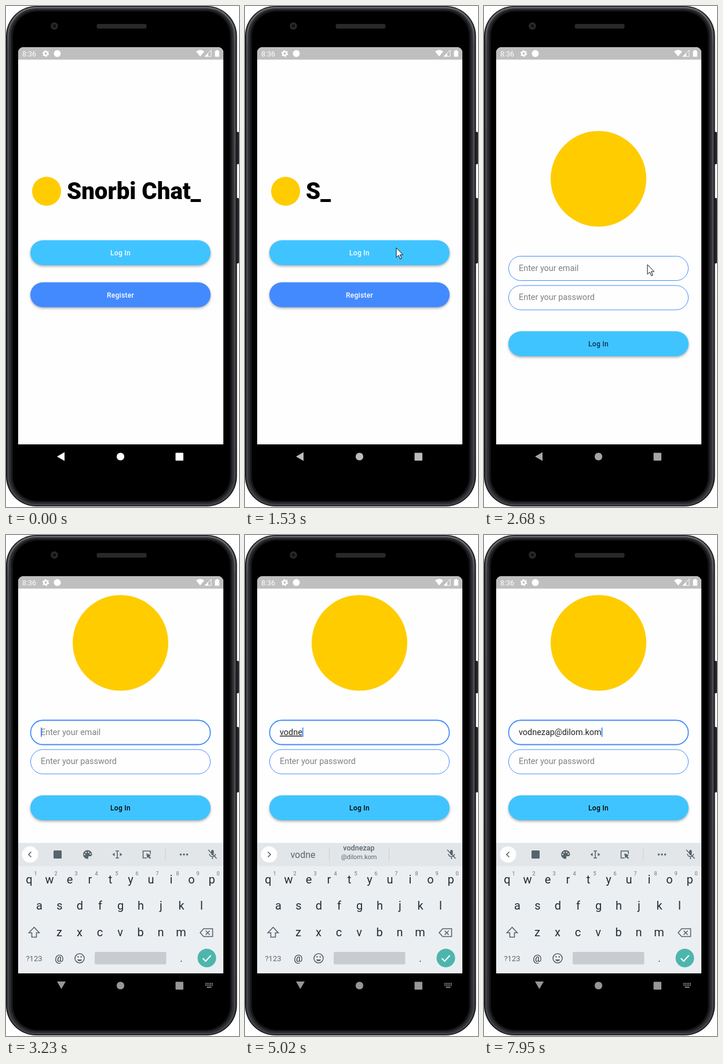
Animation of 402 by 864 pixels, one loop 8 s. Source, as an HTML page:

```html
<!DOCTYPE html>
<html lang="en">
<head>
<meta charset="utf-8">
<title>Login demo</title>
<style>
  html, body { margin: 0; width: 100%; height: 100%; overflow: hidden; background: #fff; }
  svg { display: block; width: 402px; height: 864px; font-family: Roboto, sans-serif; }
  .title { font-size: 40.2px; font-weight: 900; }
  .label { font-size: 12px; font-weight: 500; letter-spacing: .3px; text-anchor: middle; }
  .input { font-size: 14.4px; fill: #222; }
  .hint { font-size: 14.4px; fill: #808080; }
  .key { font-size: 20px; fill: #202c33; text-anchor: middle; }
  .sup { font-size: 9px; fill: #66727a; text-anchor: middle; }
  .mid { text-anchor: middle; fill: #5a666e; }
  .line { fill: none; stroke: #56636b; stroke-width: 1.6; }
  .shade { filter: drop-shadow(0 2.5px 2px rgba(0, 0, 0, .32)); }
</style>
</head>
<body>
<svg viewBox="0 0 402 864">
  <defs>
    <clipPath id="screen"><path d="M21 756V80a9 9 0 0 1 9-9H366a9 9 0 0 1 9 9V756z"/></clipPath>
    <linearGradient id="metal" x2="0" y2="1">
      <stop offset="0" stop-color="#6b6d71"/>
      <stop offset=".08" stop-color="#4a4c50"/>
      <stop offset="1" stop-color="#414347"/>
    </linearGradient>
  </defs>

  <g id="phone">
    <rect x="395" y="217" width="7" height="56" rx="2" fill="#242528"/>
    <rect x="395" y="331" width="7" height="113" rx="2" fill="#242528"/>
    <rect width="398.500" height="863" rx="52" fill="#161719"/>
    <rect x="2" y="1.500" width="394.500" height="860" rx="50" fill="url(#metal)"/>
    <rect x="5.500" y="4" width="387.500" height="855" rx="47" fill="#2c2d30"/>
    <rect x="9" y="7" width="380.500" height="849" rx="44" fill="#141517"/>
    <rect x="12" y="9.500" width="374.500" height="844" rx="42"/>
    <circle cx="83.500" cy="34.500" r="6.200" fill="#2a2a2c"/>
    <circle cx="83.500" cy="34.500" r="3" fill="#121214"/>
    <rect x="156.500" y="31" width="86" height="8" rx="3" fill="#29292a"/>
  </g>

  <g clip-path="url(#screen)">
    <rect x="21" y="71" width="354" height="685" fill="#fefefe"/>

    <g id="home">
      <text id="title" class="title" x="105" y="333"></text>
      <rect class="shade" x="42" y="404" width="311" height="43" rx="21.500" fill="#40c4ff"/>
      <circle id="ripple" cx="261" cy="426" fill="#fff"/>
      <text class="label" x="197.500" y="430" fill="#fff">Log In</text>
      <rect class="shade" x="42" y="476.500" width="311" height="43" rx="21.500" fill="#448aff"/>
      <text class="label" x="197.500" y="502.500" fill="#fff">Register</text>
    </g>

    <g id="login">
      <rect x="21" y="92" width="354" height="664" fill="#fefefe"/>
      <g id="form">
        <rect id="focus" x="42.500" y="431.500" width="310" height="42" rx="21" fill="none" stroke="#448aff"/>
        <rect x="42.500" y="482" width="310" height="42" rx="21" fill="none" stroke="#448aff"/>
        <text id="hint" class="hint" x="60" y="457">Enter your email</text>
        <text id="email" class="input" x="60" y="457"></text>
        <rect id="caret" y="444" width="1.800" height="16" fill="#448aff"/>
        <text class="hint" x="60" y="507">Enter your password</text>
        <rect class="shade" x="42" y="561" width="311" height="43" rx="21.500" fill="#40c4ff"/>
        <text id="submit" class="label" x="197.500" y="587">Log In</text>
      </g>
    </g>

    <circle id="logo" fill="#ffcc00"/>

    <g id="keyboard">
      <rect x="21" y="531" width="354" height="225" fill="#eceff2"/>
      <rect x="21" y="531" width="354" height="40" fill="#e2e6e9"/>
      <circle cx="41.500" cy="551" r="14" fill="#fff"/>
      <path id="chevron" class="line"/>
      <g class="line">
        <rect x="354" y="543" width="4.500" height="9" rx="2.200" fill="#56636b" stroke="none"/>
        <path d="M351 550a5.300 5.300 0 0 0 10.500 0M356.300 555.500V559M349 543l14.500 15"/>
      </g>
      <g id="tools">
        <rect x="82" y="544" width="14" height="14" rx="1.500" fill="#56636b"/>
        <path d="M140.500 543.500a7.500 7.500 0 0 0 0 15c2 0 2-1.300 1.400-2.300-.5-1.200.2-2.200 1.500-2.200h2c2 0 3-1.500 3-3.500 0-4-3.600-7-7.900-7z" fill="#56636b"/>
        <g fill="#e2e6e9"><circle cx="135.800" cy="551" r="1.200"/><circle cx="138" cy="547.500" r="1.200"/><circle cx="142.500" cy="547.300" r="1.200"/><circle cx="145.500" cy="550" r="1.200"/></g>
        <path class="line" d="M189 545h6M192 545v12M189 557h6"/>
        <path d="M183.500 551l4-3v6zM200.500 551l-4-3v6z" fill="#56636b"/>
        <path class="line" d="M249 550v-5h-12.500v12h6"/>
        <path d="M242 549l8 3-2.500 1.700 2.500 3.300-1.500 1.500-3-3-1.700 2z" fill="#56636b"/>
        <path d="M275 541v20" stroke="#c9ced2"/>
        <g fill="#56636b"><circle cx="301.500" cy="551" r="1.700"/><circle cx="307" cy="551" r="1.700"/><circle cx="312.500" cy="551" r="1.700"/></g>
      </g>
      <g id="suggest">
        <path d="M145.500 540v22M248.500 540v22" stroke="#c9ced2"/>
        <text id="word" class="mid" x="100" y="557" font-size="16"></text>
        <text id="name" class="mid" x="196.500" y="544" font-size="12.600" font-weight="500"></text>
        <text id="host" class="mid" x="196.500" y="559" font-size="11"></text>
      </g>
      <g id="keys"></g>
      <path class="line" d="M48.500 676.500l-9 9.500h5v7.500h8V686h5z"/>
      <path class="line" d="M341 679h15.500v13.500H341l-6-6.700zM344.500 682.500l7 7M351.500 682.500l-7 7"/>
      <text class="mid" x="48.500" y="734.500" font-size="13">?123</text>
      <text class="key" x="92" y="736" style="font-size:17px">@</text>
      <g class="line"><circle cx="127" cy="730" r="8"/><path d="M122.800 732a4.500 4.500 0 0 0 8.400 0z" fill="#56636b" stroke="none"/></g>
      <g fill="#56636b"><circle cx="124.300" cy="727.500" r="1.300"/><circle cx="129.700" cy="727.500" r="1.300"/></g>
      <rect x="153" y="719" width="123.500" height="21.500" rx="2.500" fill="#c8ccd0"/>
      <text class="key" x="302.500" y="736" style="font-size:17px">.</text>
      <circle cx="346.500" cy="729.500" r="16" fill="#4db6ac"/>
      <path d="M339.500 730l5 5 9-10" fill="none" stroke="#fff" stroke-width="2"/>
    </g>

    <rect x="21" y="71" width="354" height="21.500" fill="#bfbfbf"/>
    <g fill="#fff">
      <text x="28" y="86.500" font-size="12.500">8:36</text>
      <circle cx="68.500" cy="82" r="3.200" fill="none" stroke="#fff" stroke-width="2.600"/>
      <circle cx="68.500" cy="82" r="5" fill="none" stroke="#fff" stroke-width="1.700" stroke-dasharray="2.600 2.636"/>
      <circle cx="88.500" cy="82" r="6"/>
      <path d="M328 78.500a10 10 0 0 1 14 0L335 87z"/>
      <path d="M354 76v11h-11z" fill="none" stroke="#fff"/>
      <path d="M349 81.500V87h-6z"/>
      <path d="M360.500 77.500h2V76h3.500v1.500h2V87.500h-7.500z"/>
    </g>
  </g>

  <g id="nav">
    <path id="back"/>
    <circle cx="197.500" cy="777" r="6.600"/>
    <rect x="292.500" y="770.500" width="13.500" height="13.500" rx="1"/>
    <g id="imeKey">
      <path d="M344 773.500h13M344 776.500h13" fill="none" stroke="currentColor" stroke-width="1.800" stroke-dasharray="1.700 1.100"/>
      <rect x="346.500" y="779" width="8" height="1.700"/>
    </g>
  </g>

  <path id="mouse" d="M0 0V16.500L3.900 12.900 6.800 19.300 9.300 18.200 6.400 12H11.500z" fill="#fff" stroke="#111"/>
</svg>

<script>
const LOOP = 8000;
const APP = 'Snorbi Chat';
const USER = 'vodnezap', HOST = '@dilom.kom';
const KEY_TIMES = [4160, 4420, 4600, 4800, 4960, 5170, 5320, 5490, 5870,
                   6180, 6480, 6660, 6850, 7030, 7340, 7550, 7750, 7950];
const NAV = [[450, 255], [1450, 188], [1530, 188], [2140, 165], [2600, 165], [3380, 150]];
const MOUSE_X = [[650, 403], [1300, 261], [2450, 261], [2660, 282], [2900, 282], [3180, 404]];
const MOUSE_Y = [[650, 478], [1300, 417], [2450, 417], [2660, 446], [2900, 446], [3180, 780]];

const ui = {};
document.querySelectorAll('[id]').forEach(el => ui[el.id] = el);

const clamp = v => Math.min(1, Math.max(0, v));
const easeOut = p => 1 - (1 - p) ** 3;
const smooth = p => p * p * (3 - 2 * p);
const span = (t, a, b) => clamp((t - a) / (b - a));
const mix = (a, b, p) => a + (b - a) * p;
const show = (el, on) => el.style.display = on ? '' : 'none';

function set(el, attrs) {
  for (const k in attrs) el.setAttribute(k, attrs[k]);
}

function setText(el, s) {
  if (el.textContent !== s) el.textContent = s;
}

function track(t, stops) {
  const i = stops.findIndex(s => s[0] > t);
  if (i === 0) return stops[0][1];
  if (i < 0) return stops[stops.length - 1][1];
  const [a, b] = [stops[i - 1], stops[i]];
  return mix(a[1], b[1], smooth(span(t, a[0], b[0])));
}

function buildKeys() {
  const rows = [['qwertyuiop', 40, 600.5], ['asdfghjkl', 57.5, 645.5], ['zxcvbnm', 92, 691.5]];
  let out = '';
  rows.forEach(([letters, x0, y], row) => [...letters].forEach((c, i) => {
    const x = x0 + i * 35;
    out += `<text class="key" x="${x}" y="${y}">${c}</text>`;
    if (!row) out += `<text class="sup" x="${x + 11}" y="586.5">${(i + 1) % 10}</text>`;
  }));
  ui.keys.innerHTML = out;
}

function drawHome(t) {
  const count = t < 1250 ? APP.length : t < 1430 ? 0 : 1 + Math.floor((t - 1430) / 200);
  setText(ui.title, APP.slice(0, count) + '_');
  const press = span(t, 1540, 1800);
  set(ui.ripple, { r: 21 * easeOut(press), opacity: 0.25 * (1 - span(t, 1750, 2000)) });
}

function drawLogin(t) {
  const enter = easeOut(span(t, 1720, 2080));
  const lift = smooth(span(t, 2880, 3180));
  show(ui.login, enter > 0);
  show(ui.home, enter < 1);
  ui.login.style.opacity = enter;
  set(ui.form, { transform: `translate(0 ${mix(100, 0, enter) - 112 * lift})` });
  set(ui.logo, {
    cx: mix(70, 197.5, enter),
    cy: mix(319.5, 298, enter) - 112 * lift,
    r: mix(25, 82.5, enter)
  });
  set(ui.focus, { 'stroke-width': t < 2800 ? 1 : 1.8 });
  set(ui.submit, { fill: t < 2800 ? '#12304f' : '#000' });
  set(ui.keyboard, { transform: `translate(0 ${225 * (1 - lift)})` });
  show(ui.keyboard, lift > 0);
}

function drawTyping(t) {
  const typed = (USER + HOST).slice(0, KEY_TIMES.filter(k => k <= t).length);
  const suggesting = t >= 4300 && t < 5960;
  setText(ui.email, typed);
  setText(ui.word, typed.slice(0, USER.length));
  set(ui.email, { 'text-decoration': t < 5870 ? 'underline' : 'none' });
  show(ui.hint, !typed);
  show(ui.caret, typed || (t >= 2900 && t < 3610));
  set(ui.caret, { x: 60 + (typed ? ui.email.getComputedTextLength() : 0) });
  show(ui.tools, !suggesting);
  show(ui.suggest, suggesting);
  set(ui.chevron, { d: suggesting ? 'M39.5 546.5l4.5 4.5-4.5 4.5' : 'M43.5 546.5l-4.5 4.5 4.5 4.5' });
}

function drawNav(t) {
  const open = t >= 2900;
  const v = Math.round(track(t, NAV));
  ui.nav.style.color = ui.nav.style.fill = `rgb(${v},${v},${v})`;
  set(ui.back, { d: open ? 'M88 770h15l-7.5 13z' : 'M88 777l13-7.5v15z' });
  show(ui.imeKey, open);
  set(ui.mouse, { transform: `translate(${track(t, MOUSE_X)} ${track(t, MOUSE_Y)})` });
}

function draw(t) {
  drawHome(t);
  drawLogin(t);
  drawTyping(t);
  drawNav(t);
}

buildKeys();
setText(ui.name, USER);
setText(ui.host, HOST);
const start = performance.now();
function tick() {
  draw((performance.now() - start) % LOOP);
  requestAnimationFrame(tick);
}
tick();
</script>
</body>
</html>
```
